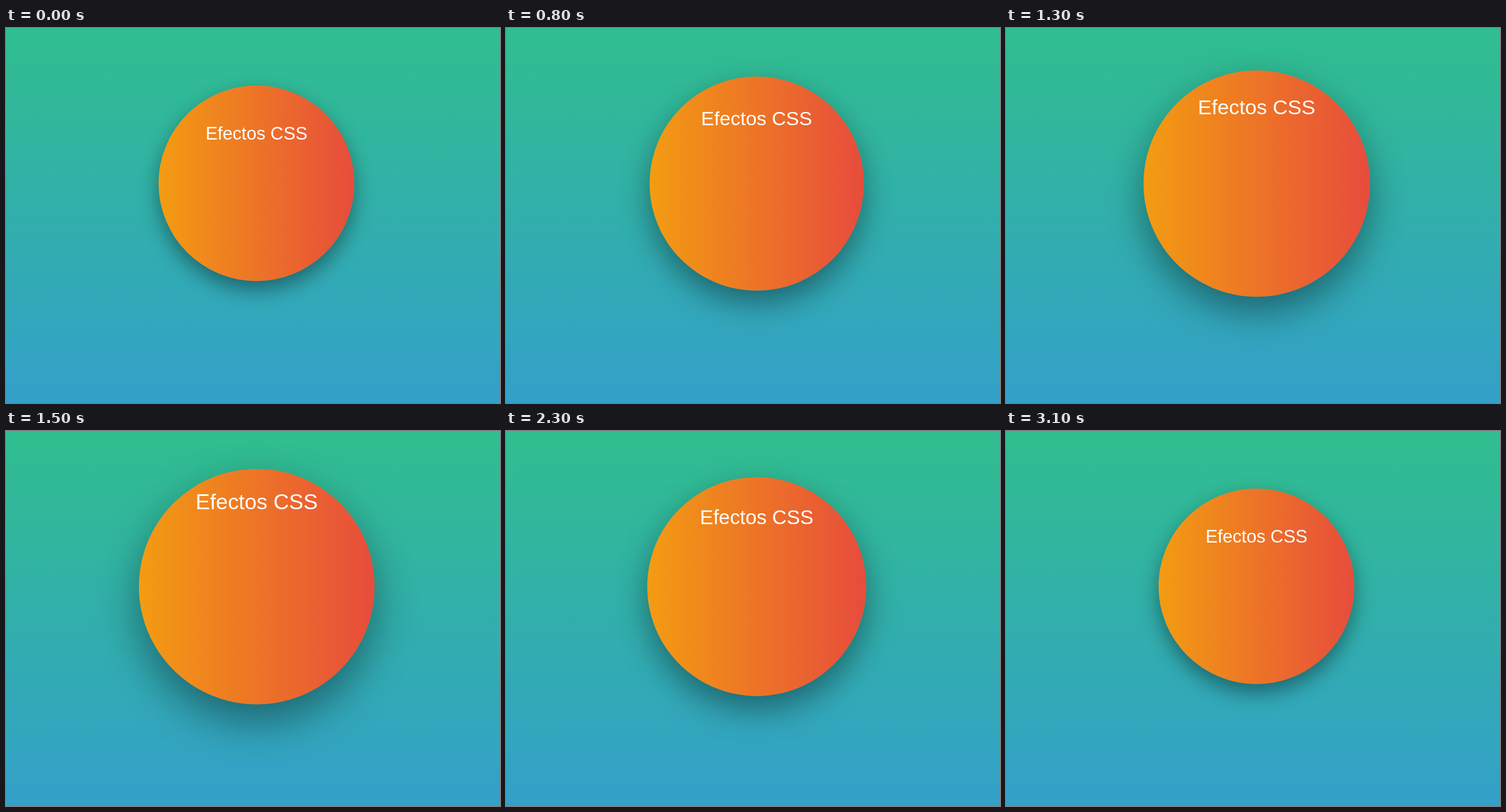
An HTML page that plays this animation: 858 by 652 pixels, repeating every 3800 ms.

```html
<!DOCTYPE html>
<html lang="es">
<head>
<meta charset="utf-8">
<title>Efectos CSS</title>
<style>
  html, body { margin: 0; width: 100%; height: 100%; overflow: hidden; }
  body { position: relative; background: linear-gradient(rgb(48, 190, 142), rgb(51, 160, 201)); }
  #ball {
    position: absolute; left: 264.8px; top: 99.5px; width: 340.6px; height: 340.6px;
    border-radius: 50%;
    background: linear-gradient(90deg, #f39c12, #e74c3c);
  }
  #label {
    position: absolute; left: 0; top: 68.3px; width: 100%;
    font: 31.2px/1 "Liberation Sans", Arial, sans-serif;
    text-align: center; color: #fff; white-space: nowrap;
  }
</style>
</head>
<body>
<div id="ball"><div id="label">Efectos CSS</div></div>
<script>
const LOOP = 3800, STEP = 100, DURATION = 300;
// Start times of each hover: [pointer enters, pointer leaves]
const hovers = [[203, 705], [1160, 1762], [2200, 2800]];
const ball = document.getElementById('ball');
const label = document.getElementById('label');

const bezier = (u, a, b) => 3 * u * (1 - u) ** 2 * a + 3 * u * u * (1 - u) * b + u ** 3;

// CSS "ease": cubic-bezier(.25, .1, .25, 1)
function ease(x) {
  if (x <= 0) return 0;
  if (x >= 1) return 1;
  let lo = 0, hi = 1;
  for (let i = 0; i < 24; i++) {
    const mid = (lo + hi) / 2;
    if (bezier(mid, .25, .25) < x) lo = mid; else hi = mid;
  }
  return bezier(lo, .1, 1);
}

const mix = (a, b, p) => a + (b - a) * p;

function draw(now) {
  // The motion advances in tenths of a second
  const t = Math.floor(now % LOOP / STEP) * STEP;
  const p = hovers.reduce((sum, [enter, leave]) =>
    sum + ease((t - enter) / DURATION) - ease((t - leave) / DURATION), 0);
  ball.style.transform = `scale(${mix(1, 1.2, p)})`;
  ball.style.boxShadow = `0 ${mix(15, 25, p)}px ${mix(35, 60, p)}px rgba(0, 0, 0, .4)`;
  label.style.transform = `translateY(${mix(0, -36, p)}px)`;
}

const start = performance.now();
function tick() {
  draw(performance.now() - start);
  requestAnimationFrame(tick);
}
tick();
</script>
</body>
</html>
```
